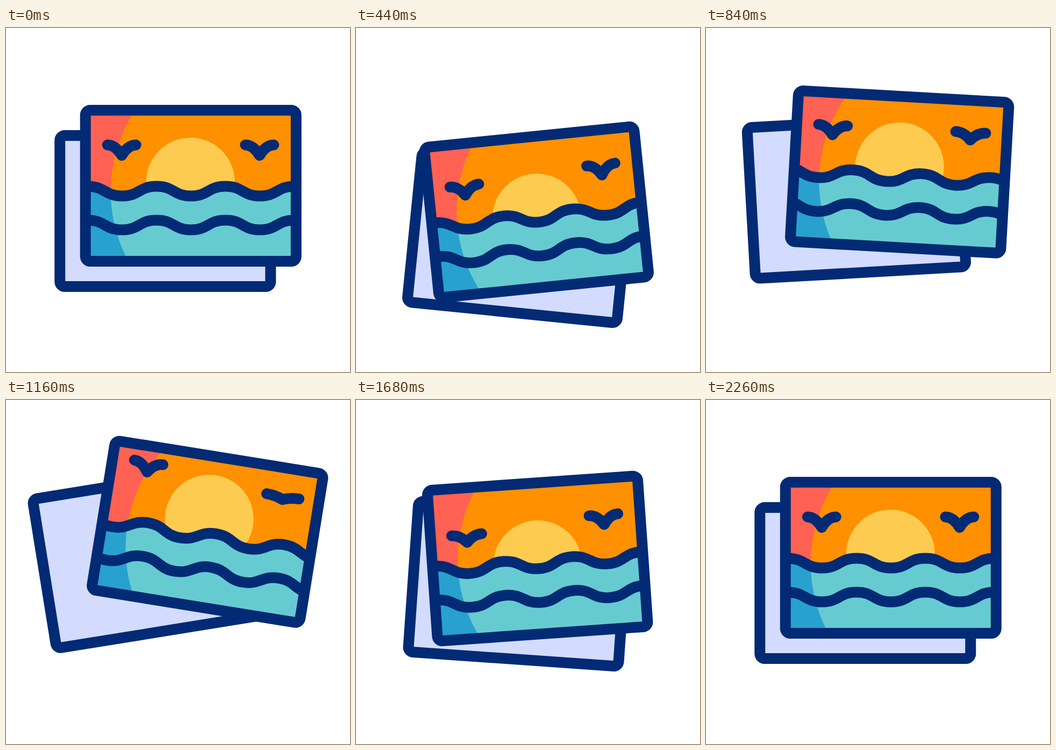
An HTML page that plays this animation: 640 by 640 pixels, repeating every 2440 ms.

```html
<!DOCTYPE html>
<html lang="en">
<head>
<meta charset="utf-8">
<title>Postcards</title>
<style>
  html, body { margin: 0; width: 100%; height: 100%; overflow: hidden; background: #fff; }
  svg { display: block; width: 100%; height: 100%; }
  .line { fill: none; stroke: #032a74; stroke-width: 20; stroke-linecap: round; stroke-linejoin: round; }
</style>
</head>
<body>
<svg viewBox="0 0 640 640">
  <defs>
    <clipPath id="inside"><rect x="-190" y="-135" width="380" height="270"/></clipPath>
    <clipPath id="sea"><path class="seaShape"/></clipPath>
    <rect id="card" x="-196" y="-140.5" width="392" height="281" rx="9"/>
  </defs>
  <g id="back"><use href="#card" class="line" style="fill:#d3dcfe"/></g>
  <g id="front">
    <g clip-path="url(#inside)">
      <rect x="-190" y="-135" width="380" height="270" fill="#ff6153"/>
      <circle cx="125" cy="10.5" r="274" fill="#ff9000"/>
      <circle id="sun" cx="-.5" cy="-7" r="82.5" fill="#fdcb50"/>
      <path class="seaShape" fill="#28a1ce"/>
      <circle cx="125" cy="10.5" r="274" fill="#66cbd1" clip-path="url(#sea)"/>
      <path class="line wave"/>
      <path class="line wave"/>
    </g>
    <use href="#card" class="line"/>
    <path id="left" class="line"/>
    <path id="right" class="line"/>
  </g>
</svg>
<script>
const LOOP = 2440, PERIOD = 128.25;
const $ = s => document.querySelector(s);
const set = (el, name, value) => el.setAttribute(name, value);

// Each track is a list of [ms, value] steps.
const tracks = {
  angle: [[200, 0], [440, -5.75], [490, -6], [740, 1.3], [840, 3.2], [1160, 9.15], [1290, 10],
          [1400, 9.92], [1540, 4], [1680, -4], [1820, -1.7], [1990, 2.6], [2260, 0]],
  dx:    [[200, 0], [440, -8], [490, -8.3], [740, 5.5], [840, 16.3], [1160, 31], [1290, 33],
          [1400, 32.8], [1540, 16], [1680, -6], [1820, -1], [1990, 9], [2260, 0]],
  dy:    [[200, 0], [440, 48.8], [495, 57], [740, -8], [840, -25.6], [1160, -48.2], [1230, -50.5],
          [1400, -11.5], [1530, 30], [1680, 1.4], [1820, -1], [1990, -22], [2260, 0]],
  sun:   [[200, 0], [440, 18], [840, -2.5], [1160, -17], [1330, -20.5], [1400, -20], [1680, 18.5], [1990, -7], [2260, 0]],
  left:  [[200, 0], [440, 12], [840, -5.5], [1160, -35.5], [1240, -37], [1400, -28.7], [1680, 17.5], [1990, -9], [2260, 0]],
  right: [[440, 0], [840, -10], [1160, -25], [1240, -26], [1400, -17.6], [1680, 2], [1990, -5], [2260, 0]],
  flow:  [[390, 0], [840, 105], [1160, 208], [1440, 2 * PERIOD]]
};

// Smooth interpolation that never overshoots a step.
function at(keys, t) {
  const last = keys.length - 1;
  if (t <= keys[0][0]) return keys[0][1];
  if (t >= keys[last][0]) return keys[last][1];
  const i = keys.findIndex(k => k[0] > t) - 1;
  const rise = j => (keys[j + 1][1] - keys[j][1]) / (keys[j + 1][0] - keys[j][0]);
  const slope = j => {
    if (j === 0 || j === last) return 0;
    const a = rise(j - 1), b = rise(j);
    return a * b > 0 ? 2 * a * b / (a + b) : 0;
  };
  const [t0, v0] = keys[i], [t1, v1] = keys[i + 1];
  const h = t1 - t0, u = (t - t0) / h, w = 1 - u;
  return v0 * w * w * (1 + 2 * u) + v1 * u * u * (3 - 2 * u)
       + h * u * w * (slope(i) * w - slope(i + 1) * u);
}

function wavePath(shift, top) {
  const half = PERIOD / 2;
  let d = `M${-192 - 2 * PERIOD + shift % PERIOD} ${top}`;
  for (let i = 0; i < 10; i++) {
    const y = i % 2 ? -18 : 18;
    d += `c${half / 2} 0 ${half / 2} ${y} ${half} ${y}`;
  }
  return d;
}

// Four wing beats of 400 ms; the wings reach down as the sag shrinks.
function birdPath(x, y, t, start) {
  const beat = t > start && t < start + 1600 ? (t - start) / 400 : 0;
  const sag = 12 + 7.5 * Math.cos(2 * Math.PI * beat);
  const w = 32.3 - 0.3 * sag;
  return `M${x - w} ${y - sag}C${x - w * .5} ${y - sag} ${x - w * .2} ${y - sag * .45} ${x} ${y}`
       + `C${x + w * .2} ${y - sag * .45} ${x + w * .5} ${y - sag} ${x + w} ${y - sag}`;
}

const seaShapes = document.querySelectorAll('.seaShape');
const waves = document.querySelectorAll('.wave');

function draw(t) {
  const v = {};
  for (const name in tracks) v[name] = at(tracks[name], t);
  set($('#back'), 'transform', `translate(${296.25 - v.dx} ${340.5 + v.dy}) rotate(${-v.angle})`);
  set($('#front'), 'transform', `translate(${343.75 + v.dx} ${293.5 + v.dy}) rotate(${v.angle})`);
  set($('#sun'), 'cy', -7 + v.sun);
  const upper = wavePath(v.flow, 1);
  seaShapes.forEach(p => set(p, 'd', upper + 'V200H-500Z'));
  set(waves[0], 'd', upper);
  set(waves[1], 'd', wavePath(v.flow, 64));
  set($('#left'), 'd', birdPath(-128.5, -56.5 + v.left, t, 400));
  set($('#right'), 'd', birdPath(128, -56.5 + v.right, t, 520));
}

const begin = performance.now();
function tick() {
  draw((performance.now() - begin) % LOOP);
  requestAnimationFrame(tick);
}
tick();
</script>
</body>
</html>
```
